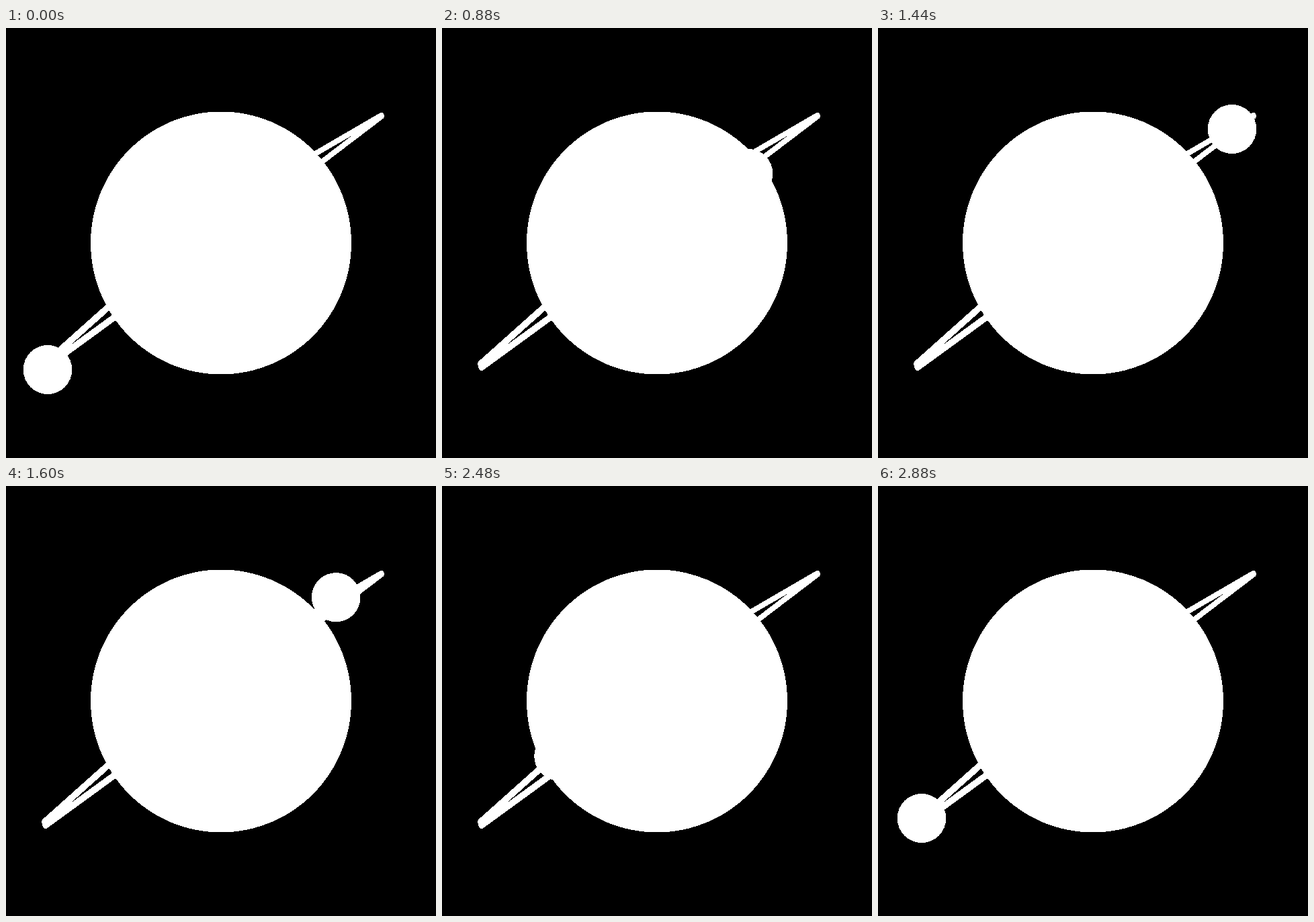
Write an HTML page that moves like this. It is 640 px wide and 640 px high and loops after 2.96 s.

```html
<!DOCTYPE html>
<html lang="en">
<head>
<meta charset="utf-8">
<title>Orbit</title>
<style>
html, body { margin: 0; width: 100%; height: 100%; overflow: hidden; background: #000; }
svg { display: block; width: 640px; height: 640px; fill: #fff; }
.ring { fill: none; stroke: #fff; stroke-linejoin: round; }
</style>
</head>
<body>
<svg viewBox="0 0 640 640" shape-rendering="crispEdges">
  <path class="ring" stroke-width="9.6" d="M185 386 L58 499.5 L59 505 L195 406"/>
  <path class="ring" stroke-width="8" d="M445 196 L558.5 130 L559 131.5 L450 214.5"/>
  <ellipse cx="320" cy="320" rx="194" ry="195.5"/>
  <ellipse id="moon" rx="36.3" ry="36.6"/>
</svg>
<script>
const moon = document.getElementById('moon');
const STEP = 80, STEPS = 37;

// Key points of the orbit: step, x, y
const orbit = [
  [0, 62, 508.5], [4, 158, 440.5], [11, 456, 216.5],
  [16, 558.5, 139], [17, 552.5, 137.5], [18, 527, 150.5],
  [23, 430, 199], [31, 173.5, 402], [36, 65, 494.5]
];

// Key i of the endless orbit, its step shifted by whole loops
function key(i) {
  const n = orbit.length, turn = Math.floor(i / n);
  const [step, x, y] = orbit[i - turn * n];
  return [step + turn * STEPS, x, y];
}

// Smooth closed curve through the keys
function moonAt(step) {
  const i = orbit.findLastIndex(k => k[0] <= step);
  const [a, b, c, d] = [-1, 0, 1, 2].map(o => key(i + o));
  const span = c[0] - b[0], u = (step - b[0]) / span, v = 1 - u;
  const slope = (p, q, k) => (q[k] - p[k]) / (q[0] - p[0]) * span;
  return [1, 2].map(k =>
    b[k] + (c[k] - b[k]) * u * u * (3 - 2 * u) +
    u * v * (slope(a, c, k) * v - slope(b, d, k) * u));
}

function draw(ms) {
  const [x, y] = moonAt(Math.floor(ms / STEP) % STEPS);
  moon.setAttribute('cx', x);
  moon.setAttribute('cy', y);
}

let start;
function tick(now) {
  start ??= now;
  draw(now - start);
  requestAnimationFrame(tick);
}
draw(0);
requestAnimationFrame(tick);
</script>
</body>
</html>
```
